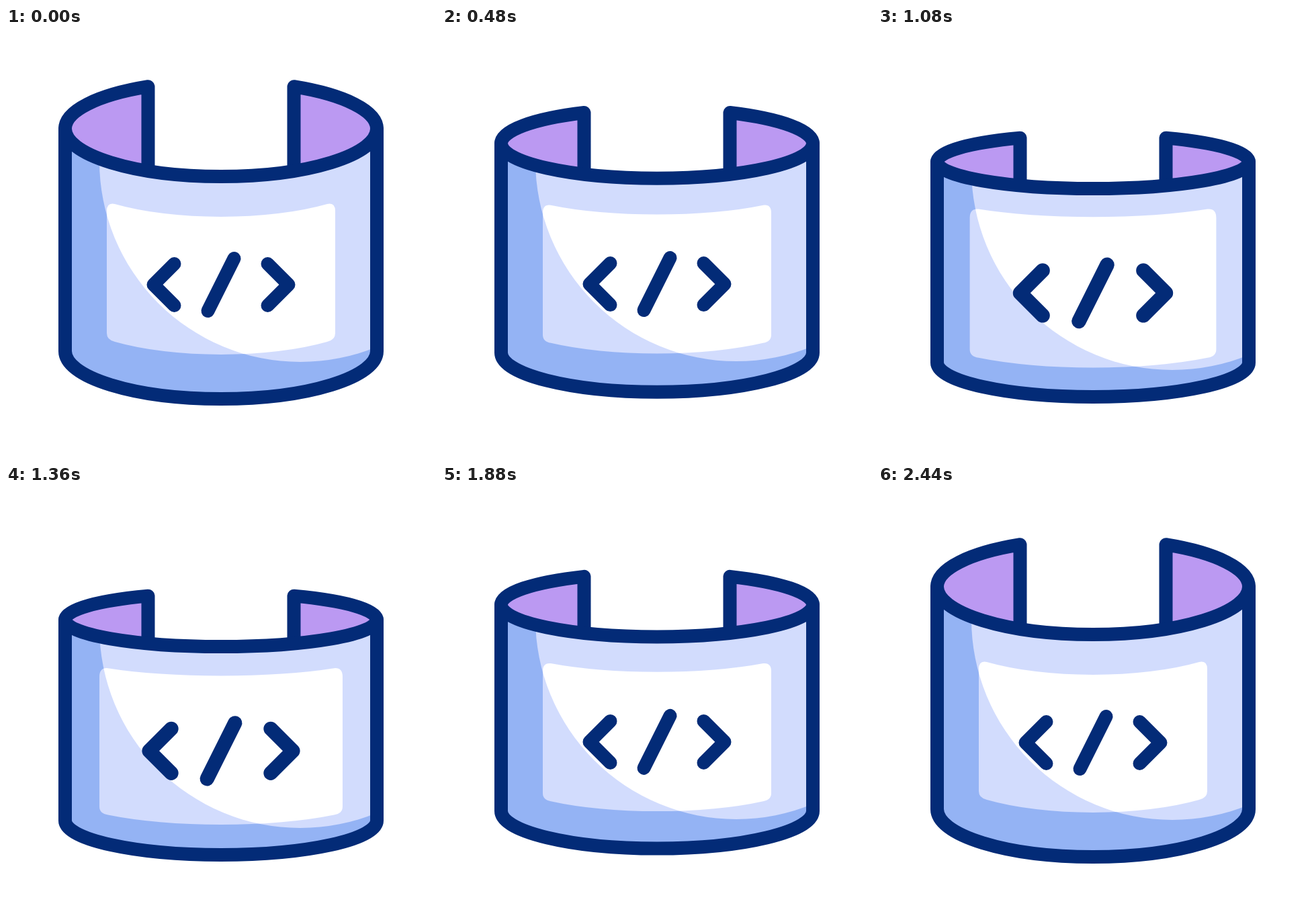
Recreate the animation shown at these times as an HTML page with a canvas. Size 640 by 640 pixels, loop 2.48 s.

```html
<!DOCTYPE html>
<html lang="en">
<head>
<meta charset="utf-8">
<title>Curved code screen</title>
<style>
  html, body { margin: 0; width: 100%; height: 100%; overflow: hidden; background: #fff; }
  canvas { display: block; width: 640px; height: 640px; }
</style>
</head>
<body>
<canvas id="stage" width="640" height="640"></canvas>
<script>
const ctx = document.getElementById('stage').getContext('2d');
const LOOP = 2480;
const NAVY = '#032b77', PURPLE = '#bb99f2', BLUE = '#94b3f4', PALE = '#d2dcfd', WHITE = '#ffffff';
const CX = 320, RX = 232, TAB = 108.5, LINE = 20;
const SMOOTH = 1 / 3, STEEP = 0.48;

// Symmetric cubic ease between two times; a larger pull makes the middle steeper.
function ease(t, from, to, pull) {
  const u = Math.min(1, Math.max(0, (t - from) / (to - from)));
  let lo = 0, hi = 1;
  for (let i = 0; i < 24; i++) {
    const s = (lo + hi) / 2, r = 1 - s;
    const x = 3 * pull * r * r * s + 3 * (1 - pull) * r * s * s + s * s * s;
    if (x < u) lo = s; else hi = s;
  }
  return lo * lo * (3 - 2 * lo);
}

function pose(t) {
  const flat = ease(t, 60, 810, STEEP) - ease(t, 1600, 2390, STEEP);
  const lift = ease(t, 480, 960, SMOOTH) - ease(t, 1405, 1890, SMOOTH);
  const zoom = ease(t, 800, 1200, SMOOTH) - ease(t, 1200, 1600, SMOOTH);
  return {
    shift: 13.5 * lift - 1.5 * flat,
    scale: 1 + 0.1 * zoom,
    rimY: 150 + 37 * flat,
    rimRy: 71 - 31 * flat,
    baseY: 481 + 5 * flat,
    baseRy: 71 - 20 * flat,
    screenTop: 281 - 4 * flat,
    screenBottom: 486 - flat
  };
}

const drop = (dx, ry) => ry * Math.sqrt(1 - (dx / RX) ** 2);

function fill(path, color) {
  ctx.fillStyle = color;
  ctx.fill(path);
}

function stroke(path) {
  ctx.strokeStyle = NAVY;
  ctx.lineWidth = LINE;
  ctx.lineCap = ctx.lineJoin = 'round';
  ctx.stroke(path);
}

function bodyPath(p) {
  const path = new Path2D();
  path.ellipse(CX, p.rimY, RX, p.rimRy, 0, 0, Math.PI);
  path.lineTo(CX - RX, p.baseY);
  path.ellipse(CX, p.baseY, RX, p.baseRy, 0, Math.PI, 0, true);
  path.closePath();
  return path;
}

function tabPath(p, side) {
  const angle = Math.acos(TAB / RX);
  const path = new Path2D();
  if (side < 0) path.ellipse(CX, p.rimY, RX, p.rimRy, 0, Math.PI, Math.PI + angle);
  else path.ellipse(CX, p.rimY, RX, p.rimRy, 0, 0, -angle, true);
  path.lineTo(CX + side * TAB, p.rimY + drop(TAB, p.rimRy));
  return path;
}

function tabFill(p, side) {
  const path = tabPath(p, side);
  const angle = Math.acos(TAB / RX);
  if (side < 0) path.ellipse(CX, p.rimY, RX, p.rimRy, 0, Math.PI - angle, Math.PI);
  else path.ellipse(CX, p.rimY, RX, p.rimRy, 0, angle, 0, true);
  path.closePath();
  return path;
}

function screenPath(p) {
  const half = 170, inset = 158;
  const left = CX - half, right = CX + half;
  const topY = p.screenTop - p.rimRy, bottomY = p.screenBottom - p.baseRy;
  const topCorner = topY + drop(half, p.rimRy) + 1;
  const bottomCorner = bottomY + drop(half, p.baseRy) + 1;
  const angle = Math.acos(inset / RX);
  const path = new Path2D();
  path.moveTo(left, topCorner + 13);
  path.quadraticCurveTo(left, topCorner, CX - inset, topY + drop(inset, p.rimRy));
  path.ellipse(CX, topY, RX, p.rimRy, 0, Math.PI - angle, angle, true);
  path.quadraticCurveTo(right, topCorner, right, topCorner + 13);
  path.lineTo(right, bottomCorner - 10);
  path.quadraticCurveTo(right, bottomCorner, CX + inset, bottomY + drop(inset, p.baseRy));
  path.ellipse(CX, bottomY, RX, p.baseRy, 0, angle, Math.PI - angle);
  path.quadraticCurveTo(left, bottomCorner, left, bottomCorner - 10);
  path.closePath();
  return path;
}

const symbol = new Path2D(
  'M250.5 351L219.5 382L250.5 413M389.5 351L420.5 382L389.5 413M339.5 343L300.5 421');
const glow = new Path2D();
glow.arc(438, 198, 299, 0, Math.PI * 2);

function zoomAbout(scale) {
  const y = 377;
  ctx.translate(CX, y);
  ctx.scale(scale, scale);
  ctx.translate(-CX, -y);
}

function draw(t) {
  const p = pose(t);
  const body = bodyPath(p), screen = screenPath(p);

  ctx.fillStyle = WHITE;
  ctx.fillRect(0, 0, 640, 640);
  ctx.save();
  ctx.translate(0, p.shift);

  for (const side of [-1, 1]) {
    fill(tabFill(p, side), PURPLE);
    stroke(tabPath(p, side));
  }

  fill(body, BLUE);
  ctx.save();
  ctx.clip(body);
  fill(glow, PALE);
  ctx.restore();

  ctx.save();
  zoomAbout(p.scale);
  fill(screen, PALE);
  ctx.clip(screen);
  zoomAbout(1 / p.scale);
  fill(glow, WHITE);
  ctx.restore();

  ctx.save();
  zoomAbout(p.scale);
  stroke(symbol);
  ctx.restore();

  stroke(body);
  ctx.restore();
}

function tick() {
  draw(performance.now() % LOOP);
  requestAnimationFrame(tick);
}
tick();
</script>
</body>
</html>
```
